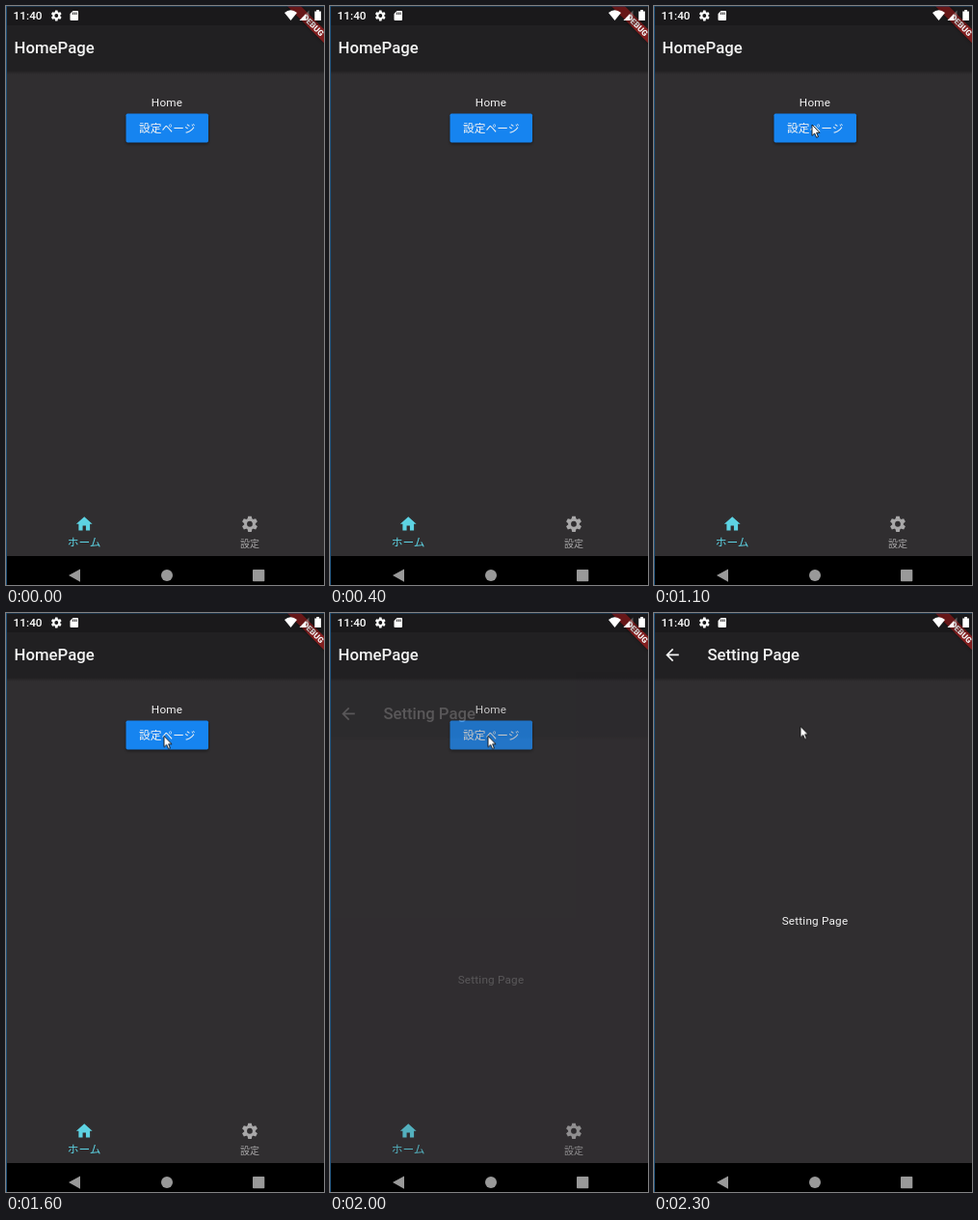
Write an HTML page that moves like this. It is 330 px wide and 600 px high and loops after 2.4 s.

```html
<!DOCTYPE html>
<html lang="ja">
<head>
<meta charset="utf-8">
<title>Page transition</title>
<style>
  html, body { margin: 0; width: 100%; height: 100%; overflow: hidden; background: #302e30; }
  svg { display: block; width: 100%; height: 100%; }
  text { font-family: Roboto, "Noto Sans CJK JP", "Noto Sans CJK", sans-serif; fill: #f3f3f3; }
  .title { font-size: 16.74px; font-weight: 500; }
  .body { font-size: 11.72px; letter-spacing: .21px; }
  .jp { font-family: "Noto Sans CJK JP", "Noto Sans CJK", sans-serif; font-size: 11.72px; }
  .mid { text-anchor: middle; }

  #page, #cursor, #press { animation: 2400ms step-end infinite; }
  #page { animation-name: page; }
  #cursor { animation-name: cursor; }
  #press { animation-name: press; }

  /* Fade upwards, sampled every 100 ms */
  @keyframes page {
    0%      { opacity: 0; transform: translateY(150px); }
    83.333% { opacity: .21; transform: translateY(61px); }
    87.5%   { opacity: .6; transform: translateY(6px); }
    91.666%, 100% { opacity: 1; transform: none; }
  }
  @keyframes cursor {
    0%      { opacity: 0; transform: translate(207px, 166px); }
    33.333% { opacity: 1; transform: translate(207px, 166px); }
    37.5%   { opacity: 1; transform: translate(190px, 149px); }
    41.666% { opacity: 1; transform: translate(172px, 130px); }
    45.833% { opacity: 1; transform: translate(164px, 123px); }
    66.666% { opacity: 1; transform: translate(164px, 127.5px); }
    91.666% { opacity: 1; transform: translate(160px, 124px); }
    95.833%, 100% { opacity: 1; transform: translate(152px, 117.5px); }
  }
  @keyframes press {
    0%  { opacity: 0; }
    75%, 100% { opacity: .05; }
  }
</style>
</head>
<body>
<svg viewBox="0 0 330 600">
  <defs>
    <linearGradient id="shade" x2="0" y2="1">
      <stop stop-color="#000" stop-opacity=".3"/>
      <stop offset="1" stop-color="#000" stop-opacity="0"/>
    </linearGradient>
    <filter id="soft" x="-20%" y="-50%" width="140%" height="200%">
      <feGaussianBlur stdDeviation="1.5"/>
    </filter>
    <path id="tooth" d="M-3-6L-2.1-9.7H2.1L3-6Z"/>
    <g id="gear">
      <circle r="5.3" fill="none" stroke="currentColor" stroke-width="3.6"/>
      <g fill="currentColor">
        <use href="#tooth"/>
        <use href="#tooth" transform="rotate(60)"/>
        <use href="#tooth" transform="rotate(120)"/>
        <use href="#tooth" transform="rotate(180)"/>
        <use href="#tooth" transform="rotate(240)"/>
        <use href="#tooth" transform="rotate(300)"/>
      </g>
    </g>
    <g id="scaffold">
      <rect width="330" height="600" fill="#302e30"/>
      <rect width="330" height="67" fill="#212022"/>
      <rect y="67" width="330" height="4" fill="url(#shade)"/>
    </g>
  </defs>

  <g id="home">
    <use href="#scaffold"/>
    <text class="title" x="8.6" y="49.3">HomePage</text>
    <text class="body mid" x="167" y="104.3">Home</text>
    <rect x="124.5" y="113" width="85.5" height="30" rx="2" opacity=".45" filter="url(#soft)"/>
    <rect x="124.5" y="111.5" width="85.5" height="30" rx="1.7" fill="#1684f0"/>
    <rect id="press" x="124.5" y="111.5" width="85.5" height="30" rx="1.7" fill="#fff"/>
    <text class="jp mid" x="167.2" y="131" font-weight="500">設定ページ</text>
    <path transform="translate(71.2 526.8) scale(.837)" fill="#5dd3e3" d="M10 20V14H14V20H19V12H22L12 3L2 12H5V20Z"/>
    <text class="jp mid" x="81.2" y="560" style="fill:#5dd3e3">ホーム</text>
    <use href="#gear" color="#a9a8a9" transform="translate(253 536.8) scale(.837)"/>
    <text class="jp mid" x="253" y="561" style="fill:#a9a8a9;font-size:10.04px">設定</text>
  </g>

  <g id="page">
    <use href="#scaffold"/>
    <path transform="translate(9 33.4) scale(.837)" fill="#f3f3f3" d="M20 11H7.8L13.4 5.4L12 4L4 12L12 20L13.4 18.6L7.8 13H20Z"/>
    <text class="title" x="55.4" y="49.3">Setting Page</text>
    <text class="body mid" x="167" y="323">Setting Page</text>
  </g>

  <g id="banner" transform="translate(339 0) rotate(45)">
    <rect x="-34" y="23.4" width="68" height="10" opacity=".5" filter="url(#soft)"/>
    <rect x="-34" y="23.4" width="68" height="10" fill="#811d1e"/>
    <text class="mid" y="31.4" font-size="8.5" font-weight="900">DEBUG</text>
  </g>

  <g id="status" fill="#fff">
    <rect width="330" height="20" fill="#000" opacity=".2"/>
    <text x="7.6" y="14.2" font-size="11.8" font-weight="500" style="fill:#fff">11:40</text>
    <use href="#gear" color="#fff" transform="translate(52.3 10) scale(.56)"/>
    <path d="M69.5 5H74Q75 5 75 6V14Q75 15 74 15H67.5Q66.5 15 66.5 14V8Z"/>
    <path d="M69.6 6.5V9M71.4 6.5V9M73.2 6.5V9" stroke="#1a191b" stroke-width=".9"/>
    <path d="M289 7Q295.5 1.6 302 7L295.5 15Z"/>
    <path d="M304.5 15L314.5 4.5V15Z" opacity=".3"/>
    <path d="M304.5 15L311 8.2V15Z"/>
    <path d="M320.3 5.4H322.2V4H325V5.4H326.9V15H320.3Z"/>
  </g>

  <g id="system-nav" fill="#999">
    <rect y="570" width="330" height="30" fill="#000"/>
    <path d="M65 590L77 583.4V596.8Z"/>
    <circle cx="167" cy="590" r="6"/>
    <rect x="256" y="584" width="12.3" height="12.3" rx=".8"/>
  </g>

  <path d="M.5 600V0" stroke="#1f5078"/>
  <path d="M0 .5H330" stroke="#1f5078" opacity=".5"/>

  <path id="cursor" d="M0 0V11.4L2.7 9L4.6 13.3L6.5 12.5L4.6 8.3H8Z" fill="#fff" stroke="#111" stroke-width=".9"/>
</svg>
</body>
</html>
```
